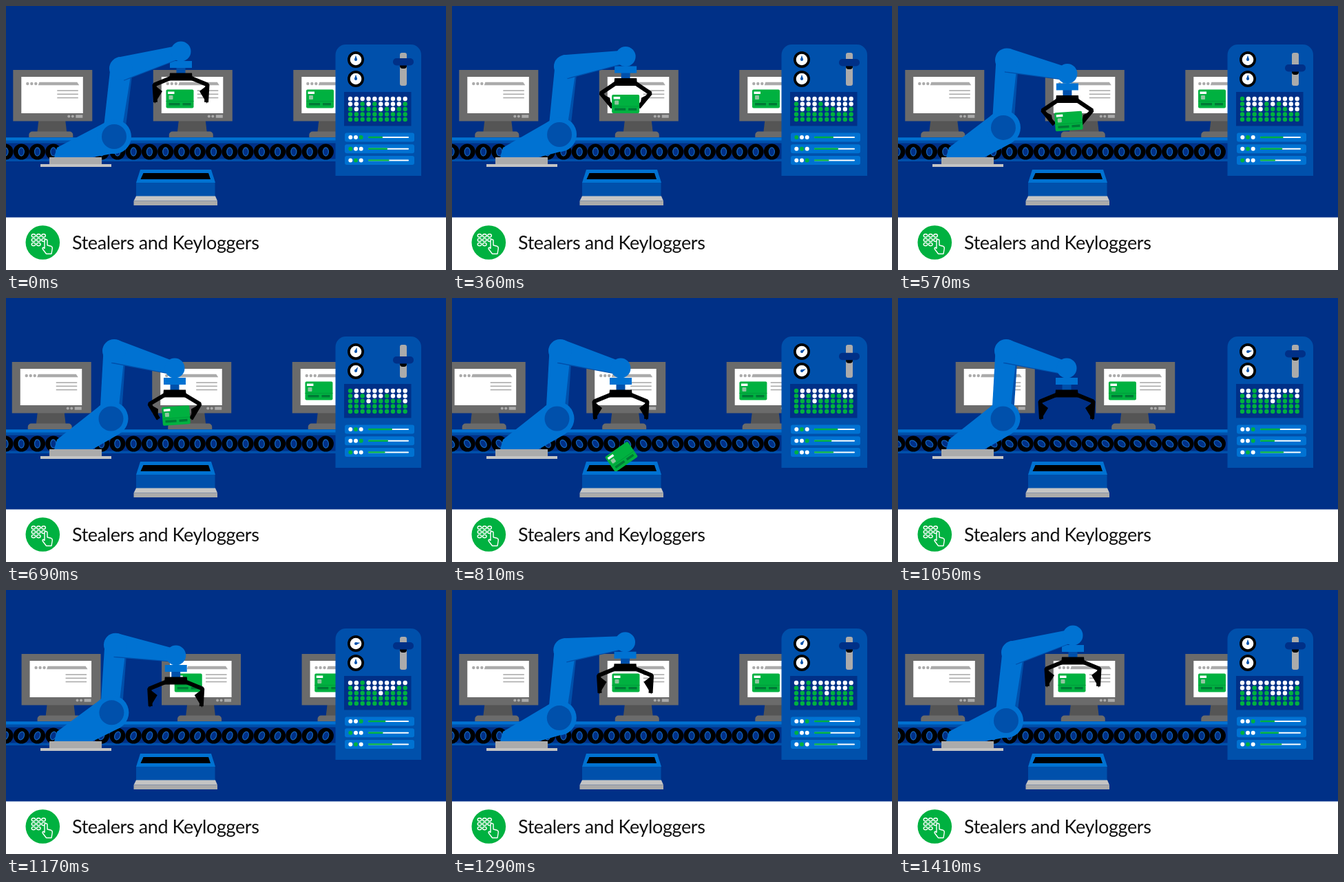
Animation, 639 px wide and 384 px high, one loop 1440 ms. Source, as an HTML page with a canvas:

```html
<!DOCTYPE html>
<html lang="en">
<head>
<meta charset="utf-8">
<title>Stealers and Keyloggers</title>
<style>
  html, body { margin: 0; width: 100%; height: 100%; overflow: hidden; background: #fff; }
  canvas { position: absolute; left: 0; top: 0; }
  p {
    position: absolute; left: 96px; top: 326px; margin: 0; white-space: nowrap;
    font: 27px/36px Lato, "Open Sans", sans-serif; letter-spacing: -0.4px; color: #111;
  }
</style>
</head>
<body>
<canvas id="stage" width="639" height="384"></canvas>
<p>Stealers and Keyloggers</p>
<script>
const c = document.getElementById('stage').getContext('2d');
const LOOP = 1440, STEP = 30, PITCH = 203.5;
const BG = '#003087', MID = '#0050ab', LIGHT = '#0072d2', GREEN = '#00b140',
      DEEP = '#007a35', FRAME = '#6b6b6b', STAND = '#555', GREY = '#ababab', PALE = '#c4c4c4';
const PICK = 270, DROP = 690;

const mix = (a, b, k) => a + (b - a) * k;
const smooth = u => u * u * (3 - 2 * u);
const part = (t, from, to) => Math.min(1, Math.max(0, (t - from) / (to - from)));
const rise = (t, from, to) => smooth(part(t, from, to));
const bell = (t, mid, width) => Math.exp(-(((t - mid) / width) ** 2));

// Motion: each part as a function of time
const travel = t => smooth(part(t, 600, 1234) ** 1.52);
const reach = t => rise(t, 240, 650) - rise(t, 1080, 1400);
const grip = t => rise(t, 60, 250) - rise(t, 660, 750);

function rect(x, y, w, h, color, r = 0) {
  c.fillStyle = color;
  c.beginPath();
  c.roundRect(x, y, w, h, r);
  c.fill();
}
function disc(x, y, r, color) {
  c.fillStyle = color;
  c.beginPath();
  c.arc(x, y, r, 0, 7);
  c.fill();
}
function poly(color, ...p) {
  c.fillStyle = color;
  c.beginPath();
  for (let i = 0; i < p.length; i += 2) c.lineTo(p[i], p[i + 1]);
  c.closePath();
  c.fill();
}
function line(color, width, ...p) {
  c.strokeStyle = color;
  c.lineWidth = width;
  c.lineJoin = 'bevel';
  c.beginPath();
  for (let i = 0; i < p.length; i += 2) c.lineTo(p[i], p[i + 1]);
  c.stroke();
}
function place(x, y, deg, draw) {
  c.save();
  c.translate(x, y);
  c.rotate(deg * Math.PI / 180);
  draw();
  c.restore();
}
function clipped(w, h, draw) {
  c.save();
  c.beginPath();
  c.rect(0, 0, w, h);
  c.clip();
  draw();
  c.restore();
}
// Tapered limb between two points
function limb(x1, y1, r1, x2, y2, r2, color) {
  const d = Math.hypot(x2 - x1, y2 - y1), nx = (y1 - y2) / d, ny = (x2 - x1) / d;
  poly(color, x1 + nx * r1, y1 + ny * r1, x2 + nx * r2, y2 + ny * r2,
       x2 - nx * r2, y2 - ny * r2, x1 - nx * r1, y1 - ny * r1);
}

function card(x, y, deg) {
  place(x, y, deg, () => {
    rect(-20, -13.5, 40, 27, GREEN, 2);
    rect(-17.5, -10.5, 9.5, 3.5, '#fff');
    rect(-16, -5, 6, 6, '#8fc79f', 1);
    rect(-20, 3, 40, 1, '#009a3a');
    rect(-16, 6, 16, 3.5, DEEP);
    rect(4, 6, 12, 3.5, DEEP);
  });
}

function monitor(x, withCard) {
  place(x, 0, 0, () => {
    poly(STAND, 37, 167, 76, 167, 78, 184, 35, 184);
    rect(23, 182.5, 64, 9, FRAME, [5, 5, 0, 0]);
    rect(0, 93, 115, 74.5, FRAME);
    rect(12, 103, 89.5, 53, '#fff');
    for (let i = 0; i < 3; i++) {
      disc(21 + 6 * i, 113, 2.2, GREY);
      rect(64, 122.3 + 5.2 * i, 30.5, 1.6, GREY);
    }
    poly(GREY, 38, 110.8, 93, 110.8, 96, 115.2, 36.5, 115.2);
    disc(81, 160.5, 2, GREY);
    disc(86.5, 160.5, 2, GREY);
    rect(91, 158.3, 10, 4.4, GREY);
    if (withCard) card(38.7, 135, 0);
  });
}

function belt(t) {
  rect(0, 191, 480, 8.5, MID);
  rect(0, 191.5, 480, 4, LIGHT);
  rect(0, 222.5, 480, 3.5, MID);
  for (let x = -1; x < 480; x += 23.27) {
    disc(x, 212, 11.5, '#000');
    place(x, 212, -360 * travel(t), () => {
      c.fillStyle = BG;
      c.strokeStyle = '#1463b8';
      c.lineWidth = 1.3;
      c.beginPath();
      c.ellipse(0, 0, 4, 6, 0, 0, 7);
      c.fill();
      c.stroke();
    });
  }
}

function claw(x, y, g) {
  for (const s of [-1, 1]) {
    const ex = x + s * mix(38.5, 36, g), ey = y + mix(48.5, 53.5, g);
    const tx = x + s * mix(37, 19, g), ty = y + 74;
    line('#000', 6, x + s * 13, y + 38, ex, ey, tx, ty);
    poly('#000', ex + s * 2, ey - 1, tx + s, ty + 2, x + s * mix(27, 23, g), y + 58 + 2 * g);
  }
  poly('#000', x - 16, y + 31.5, x + 16, y + 31.5, x + 17, y + 42.5, x - 17, y + 42.5);
}

function robot(t) {
  const k = reach(t);
  const sx = mix(157, 152.5, k), sy = mix(190, 175.5, k);
  const ex = mix(167, 157, k), ey = mix(91, 77, k);
  const wx = mix(254, 245, k), wy = mix(66, 102, k);

  rect(63, 220, 76, 11, GREY);
  rect(50, 230, 103, 4, PALE);

  limb(ex + 2, ey + 2, 15, sx + 2, sy, 13, MID);
  limb(ex, ey, 15.5, sx - 3.5, sy, 13, LIGHT);
  poly(LIGHT, 70, 220, 74, 206, sx - 16, sy - 19, sx + 12.5, sy + 22, 126, 220);
  disc(sx, sy, 25, LIGHT);
  disc(sx, sy, 18, MID);

  rect(wx - 6.5, wy + 22, 13, 10, MID);
  rect(wx - 16, wy + 14, 32, 10, LIGHT);
  limb(ex, ey + 3, 15.5, wx, wy + 2, 8, MID);
  limb(ex, ey, 17, wx, wy, 9, LIGHT);
  disc(ex, ey, 17, LIGHT);
  disc(wx, wy, 14.5, LIGHT);

  claw(wx, wy, grip(t));
  const turn = rise(t, 360, 570);
  if (t >= PICK && t < DROP) card(wx + 2 * turn, wy + 69, -4 * turn);
}

function bin(t) {
  poly(LIGHT, 195, 238, 298, 238, 304, 257, 189, 257);
  poly('#000', 199.5, 243, 294, 243, 297, 252, 195.5, 252);
  rect(189, 257, 114.5, 20, MID);
  poly(PALE, 189, 276.5, 304, 276.5, 307, 283.5, 185.5, 283.5);
  rect(185.5, 283.5, 121.5, 6.5, GREY);
  const fall = (t - DROP) / 120;
  if (fall >= 0 && fall < 1.4)
    clipped(639, 252, () => card(247 - fall, 171 + 60 * fall * fall, -4 - 31 * fall));
}

function gauge(y, deg) {
  disc(508, y, 12, '#000');
  disc(508, y, 8.3, '#fff');
  place(508, y, deg, () => poly(MID, 0, -6.5, 2, 0, -2, 0));
  disc(508, y, 2, MID);
}

function machine(t) {
  const turn = 2 * Math.PI * t / LOOP;
  rect(478.5, 56, 124.5, 191, MID, [15, 15, 0, 0]);
  gauge(78, 80 * (rise(t, 600, 950) - rise(t, 1170, 1400)));
  gauge(106, 65 * bell(t, 810, 130));

  const lever = 81.5 + 10 * bell(t, 630, 180);
  rect(572, 68, 10, 48, GREY, 3);
  rect(572, lever, 10, 9.5, '#000', [0, 0, 4, 4]);
  rect(562, lever - 5.5, 30, 10.5, BG, 5);

  // Lamps: every column rises and falls around its own level
  rect(491, 125, 97.5, 49.5, BG);
  for (let col = 0; col < 10; col++) {
    const level = 1.6 + 0.06 * col + 0.8 * Math.sin(2.9 * col - 1.4);
    const white = Math.round(level + 0.8 * Math.cos(turn - col));
    for (let row = 0; row < 5; row++)
      disc(500 + 8.85 * col, 135 + 7.5 * row, 3.2, row < white ? '#fff' : GREEN);
  }

  // Sliders: the lit dot moves on three times a loop, the bar swings once
  [Math.PI, Math.PI / 2, -1.2].forEach((phase, row) => {
    const y = 191 + 16.7 * row, third = LOOP / 3;
    const lit = (row + 2 + Math.floor((t + third - 85 - 45 * (row % 2)) / third)) % 3;
    const bar = 28 + 7 * Math.cos(turn - phase);
    rect(492, y - 6.5, 101, 13, LIGHT, 3);
    for (let d = 0; d < 3; d++) disc(500.3 + 7.7 * d, y, 3, d === lit ? GREEN : '#fff');
    rect(526, y - 1, 59, 2, '#fff', 1);
    rect(526, y - 1.2, bar, 2.4, GREEN, 1);
  });
}

function badge() {
  disc(53.3, 344, 24.8, GREEN);
  c.strokeStyle = '#fff';
  c.lineWidth = 1.4;
  for (let i = 0; i < 8; i++) {
    c.beginPath();
    c.ellipse(40 + 7.3 * (i % 3), 334 + 6.3 * Math.floor(i / 3), 2.8, 2.2, 0, 0, 7);
    c.stroke();
  }
  const hand = new Path2D('M56 353V341.5q0-2 2-2t2 2V348l5 1.2q2.5.8 2.3 3.5L66 360.5H58.5l-5.3-7q-.6-2 1.2-2.2l1.6 1.7');
  c.fillStyle = GREEN;
  c.fill(hand);
  c.stroke(hand);
}

function draw(t) {
  rect(0, 0, 639, 384, '#fff');
  rect(0, 0, 639, 307.5, BG);
  clipped(480, 307, () => {
    for (let i = 0; i < 4; i++)
      monitor(10.3 + PITCH * (i - travel(t)), i > 1 || (i === 1 && t < PICK));
    belt(t);
  });
  robot(t);
  bin(t);
  machine(t);
  badge();
}

const start = performance.now();
function tick() {
  const t = (performance.now() - start) % LOOP;
  draw(Math.floor(t / STEP) * STEP);
  requestAnimationFrame(tick);
}
tick();
</script>
</body>
</html>
```
